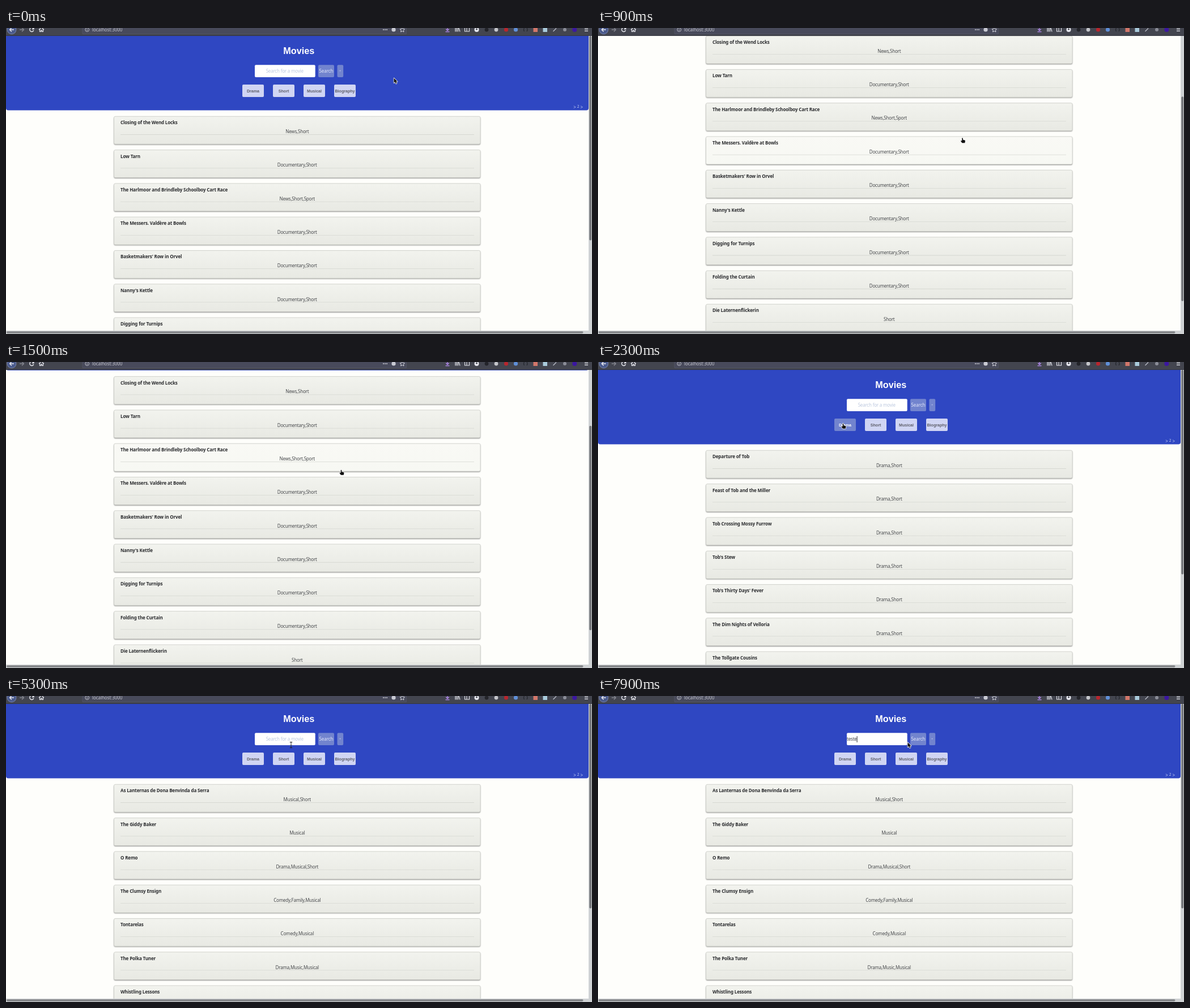
Write an HTML page with a canvas that moves like this. It is 1034 px wide and 541 px high and loops after 8000 ms.

```html
<!DOCTYPE html>
<html lang="en">
<head>
<meta charset="utf-8">
<title>Movies</title>
<style>
  html, body { margin: 0; width: 100%; height: 100%; overflow: hidden; background: #fefefb; }
  canvas { display: block; }
</style>
</head>
<body>
<canvas id="stage" width="1034" height="541"></canvas>
<script>
const ctx = document.getElementById('stage').getContext('2d');
const LOOP = 8000, STEP = 100;
const SANS = '"Noto Sans", sans-serif';
const ARIAL = '"Liberation Sans", Arial, sans-serif';

const DOC = 'Documentary,Short', DRAMA = 'Drama,Short';
const lists = {
  short: [
    ['Closing of the Wend Locks', 'News,Short'],
    ['Low Tarn', DOC],
    ['The Harlmoor and Brindleby Schoolboy Cart Race', 'News,Short,Sport'],
    ['The Messers. Valdère at Bowls', DOC],
    ["Basketmakers' Row in Orvel", DOC],
    ["Nanny's Kettle", DOC],
    ['Digging for Turnips', DOC],
    ['Folding the Curtain', DOC],
    ['Die Laternenflickerin', 'Short'],
    ['Calm Fog at Pellow', DOC]
  ],
  drama: [
    ['Departure of Tob', DRAMA],
    ['Feast of Tob and the Miller', DRAMA],
    ['Tob Crossing Mossy Furrow', DRAMA],
    ["Tob's Stew", DRAMA],
    ["Tob's Thirty Days' Fever", DRAMA],
    ['The Dim Nights of Velloria', DRAMA],
    ['The Tollgate Cousins', DRAMA]
  ],
  musical: [
    ['As Lanternas de Dona Benvinda da Serra', 'Musical,Short'],
    ['The Giddy Baker', 'Musical'],
    ['O Remo', 'Drama,Musical,Short'],
    ['The Clumsy Ensign', 'Comedy,Family,Musical'],
    ['Tontarelas', 'Comedy,Musical'],
    ['The Polka Tuner', 'Drama,Music,Musical'],
    ['Whistling Lessons', 'Drama,Musical']
  ]
};

// Keyframes: [time, value...]
const scrollKeys = [[500, 0], [600, 15], [900, 142.2], [1000, 212], [1300, 212], [1400, 174.2], [1800, 0]];
const pointerKeys = [
  [0, 684.5, 88.5], [500, 684.5, 88.5], [900, 643, 194.5], [1000, 640, 199], [1100, 640, 199],
  [1200, 637, 212], [1400, 637, 212], [1800, 455, 128], [1900, 455, 128], [2000, 437, 112],
  [2300, 432.5, 109], [2400, 432.5, 109], [2500, 440, 111], [2900, 489, 111], [3000, 489, 111],
  [3100, 497, 111], [3300, 540, 111], [3500, 540, 110], [3800, 499, 82.5], [5200, 499, 82.5],
  [5300, 503, 86.5], [5400, 503, 86.5], [5500, 499, 82], [5800, 499, 82], [5900, 495, 82],
  [6000, 490.5, 82], [7400, 490.5, 82], [7900, 546.5, 82]
];
const listKeys = [[0, 'short'], [2200, 'drama'], [2800, 'short'], [3400, 'musical']];
const typedKeys = [[0, ''], [6800, 't'], [7000, 'te'], [7200, 'tes'], [7400, 'test'], [7600, 'teste']];
const caretKeys = [[0, false], [3800, true], [5000, false], [5900, true], [6500, false], [6800, true]];

function held(keys, t) {
  return keys.filter(k => k[0] <= t).pop()[1];
}

function tween(keys, t) {
  const i = keys.findIndex(k => k[0] > t);
  if (i === 0) return keys[0].slice(1);
  if (i < 0) return keys[keys.length - 1].slice(1);
  const a = keys[i - 1], b = keys[i], p = (t - a[0]) / (b[0] - a[0]);
  return a.slice(1).map((v, j) => v + (b[j + 1] - v) * p);
}

function box(x, y, w, h, radius, fill) {
  ctx.fillStyle = fill;
  ctx.beginPath();
  ctx.roundRect(x, y, w, h, radius);
  ctx.fill();
}

function disc(x, y, r, fill) {
  ctx.fillStyle = fill;
  ctx.beginPath();
  ctx.arc(x, y, r, 0, 7);
  ctx.fill();
}

function line(path, color, width = 1.2) {
  ctx.strokeStyle = color;
  ctx.lineWidth = width;
  ctx.stroke(new Path2D(path));
}

function text(str, x, y, color, { font = '8px ' + SANS, align = 'left', spacing = -0.2 } = {}) {
  ctx.font = font;
  ctx.textAlign = align;
  ctx.letterSpacing = spacing + 'px';
  ctx.fillStyle = color;
  ctx.fillText(str, x, y);
  return ctx.measureText(str).width;
}

const inside = (p, x, y, w, h) => p.x >= x && p.x <= x + w && p.y >= y && p.y <= y + h;

function drawCard([title, genres], y, pointer) {
  const x = 190.5, w = 646.5, h = 49;
  const hover = inside(pointer, x, y, w, h);
  const fill = ctx.createLinearGradient(0, y, 0, y + h);
  fill.addColorStop(0, hover ? '#f9f9f5' : '#f2f3ee');
  fill.addColorStop(1, hover ? '#f7f8f3' : '#e8e9e3');
  ctx.save();
  ctx.shadowColor = 'rgba(0,0,0,.45)';
  ctx.shadowBlur = 2;
  ctx.shadowOffsetY = 1.2;
  box(x, y, w, h, 2.5, fill);
  ctx.restore();
  ctx.strokeStyle = '#c6c8c2';
  ctx.lineWidth = 0.7;
  ctx.stroke();
  box(202, y + 31.8, 624, 0.8, 0, '#d6d8d2');
  text(title, 202, y + 14, '#2a2b2e', { font: 'bold 8px ' + SANS, spacing: -0.14 });
  text(genres, 513.8, y + 29.8, '#46484b', { align: 'center' });
}

function drawHeader(pointer, typed, caret) {
  box(0, 14, 1028, 131.5, [0, 0, 4, 4], '#2f47c2');
  text('Movies', 516.8, 45.5, '#fff', { font: 'bold 16.2px ' + ARIAL, align: 'center', spacing: 0 });

  box(439, 65.3, 106.7, 21.7, 2, '#fff');
  if (!typed) text('Search for a movie', 491.7, 79, '#bcc8df', { align: 'center' });
  const typedWidth = typed ? text(typed, 439, 79, '#3c3e44') : 0;
  if (caret) box(439 + typedWidth, 71, 0.9, 11, 0, '#15151c');

  box(551, 65.3, 28, 21.7, 2, '#7284ce');
  text('Search', 565, 79, '#e2e7fa', { align: 'center', spacing: -0.05 });
  box(584.5, 65.3, 10.7, 21.7, 2, '#7284ce');
  text('+', 589.8, 78, '#cfd8f6', { font: '6px ' + SANS, align: 'center', spacing: 0 });

  ['Drama', 'Short', 'Musical', 'Biography'].forEach((label, i) => {
    const x = 417 + i * 54;
    const hover = inside(pointer, x, 100, 38, 22);
    box(x, 100, 38, 22, 2, hover ? '#7284ce' : '#d0d5f3');
    text(label, x + 19, 113.7, hover ? '#fff' : '#5d5e69', { font: 'bold 7.1px ' + ARIAL, align: 'center', spacing: 0 });
  });

  text('>', 1001.2, 143.2, '#c3cdf3');
  text('2', 1007.8, 141, '#c3cdf3', { font: '6.5px ' + SANS });
  text('>', 1013.6, 143.2, '#c3cdf3');
}

function drawToolbar() {
  const ink = '#e6e7ee';
  box(0, 0, 1034, 14, 0, '#43454f');
  box(0, 13, 1034, 1, 0, '#34363f');
  box(134.5, -4, 572.5, 15, 2, '#5b5d6a');
  box(135, -4, 571.5, 14.5, 2, '#484a5b');

  disc(10, 3, 8.3, '#8793bd');
  disc(10, 3, 7.6, '#4a5a8c');
  line('M14 3H6.5M10 -.5L6.5 3L10 6.5', ink, 1.4);
  line('M24 3H31.5M28 -.5L31.5 3L28 6.5', '#85868f', 1.3);
  line('M48.5 1A3.6 3.6 0 1 0 48.8 4M49 -1V1.8H46', ink, 1.4);
  line('M58 3L62.5 -1L67 3M59.5 2.5V6.5H61.6V4H63.4V6.5H65.5V2.5', ink, 1.2);
  line('M139.8 3A3.4 3.4 0 1 0 146.6 3A3.4 3.4 0 1 0 139.8 3M143.2 2.5V5M143.2 .8V1.6', '#c9cad3', 0.9);
  text('localhost:3000', 152, 6, '#c4c5ce', { spacing: -0.08 });

  for (let x = 666; x < 674; x += 3) disc(x, 3, 0.9, ink);
  disc(684, 3, 3.6, '#c9cad3');
  line('M699.3 -1L700.6 1.7L703.6 2L701.4 4L702 7L699.3 5.5L696.6 7L697.2 4L695 2L698 1.7Z', ink, 0.9);

  line('M779 -1V4.5M776.3 2L779 4.7L781.7 2M775.5 6.7H782.5', '#b78cf5', 1.3);
  line('M793 -1V6.5M795.3 -1V6.5M797.6 -1V6.5M799 0L801 6.5', ink, 1.2);
  line('M809.5 -.5H817.5V6H809.5ZM813 -.5V6', ink, 1.1);
  disc(830.5, 3, 4, ink);
  disc(830.5, 2, 1.5, '#43454f');

  disc(848, 3, 3.4, '#23242a');
  disc(865, 3, 3.4, '#c4c5ca');
  disc(882.5, 3, 3.6, '#b8262e');
  disc(899.5, 3, 3.6, '#5f8fd8');
  line('M914.5 0Q912.5 3 914.5 6M919 0Q921 3 919 6', '#24262d', 1.2);
  box(930.5, -1, 7.5, 8, 0, '#d2766a');
  box(947.5, -1, 7.5, 8, 0, '#a9cbdc');
  line('M965.5 6L971 .5', '#bfc1cb', 1.3);
  disc(986, 3, 3, '#8b8d98');
  disc(1003.3, 3, 4, '#3b17a0');
  line('M1021 .5H1027M1021 3H1027M1021 5.5H1027', ink, 1.1);
}

function drawScrollbars(scroll) {
  box(1028, 14, 6, 527, 0, '#cfd2d4');
  box(1029.3, 14 + scroll * 0.755, 3.9, 361.5, 2, '#75777b');
  box(0, 535, 1034, 6, 0, '#cfd2d4');
  box(1, 536.3, 1017.5, 3.6, 2, '#85878a');
}

function drawPointer({ x, y }, kind) {
  const shapes = {
    arrow: 'M0 0V8.6L2 6.8L3.5 10L5 9.3L3.6 6.2H6.2Z',
    hand: 'M-.8 0Q.5 -.8 .9 .6V3L4.3 3.9Q5.2 4.2 4.9 5.5L4.3 8.7H-.7L-3 5.2Q-2.8 4 -1.6 4.7L-.8 5Z'
  };
  ctx.save();
  ctx.translate(x, y);
  ctx.lineJoin = 'round';
  if (kind === 'beam') {
    line('M-2.2 -5H2.2M0 -5V5M-2.2 5H2.2', '#222', 1);
  } else {
    line(shapes[kind], '#fff', 1.5);
    ctx.fillStyle = '#111';
    ctx.fill(new Path2D(shapes[kind]));
  }
  ctx.restore();
}

function pointerKind(p, scroll) {
  const local = { x: p.x, y: p.y + scroll };
  if (inside(local, 439, 65, 107, 22)) return 'beam';
  const onButton = [0, 1, 2, 3].some(i => inside(local, 417 + i * 54, 100, 38, 22));
  return onButton || inside(local, 190, 156, 647, 600) ? 'hand' : 'arrow';
}

function draw(t) {
  const [scroll] = tween(scrollKeys, t);
  const [x, y] = tween(pointerKeys, t);
  const local = { x, y: y + scroll };

  box(0, 0, 1034, 541, 0, '#fefefb');
  ctx.save();
  ctx.translate(0, -scroll);
  drawHeader(local, held(typedKeys, t), held(caretKeys, t));
  lists[held(listKeys, t)].forEach((movie, i) => drawCard(movie, 156.3 + i * 59.28, local));
  ctx.restore();
  drawScrollbars(scroll);
  drawToolbar();
  drawPointer({ x, y }, pointerKind({ x, y }, scroll));
}

const start = performance.now();
function frame() {
  const t = (performance.now() - start) % LOOP;
  draw(Math.floor(t / STEP) * STEP);
  requestAnimationFrame(frame);
}
frame();
</script>
</body>
</html>
```
